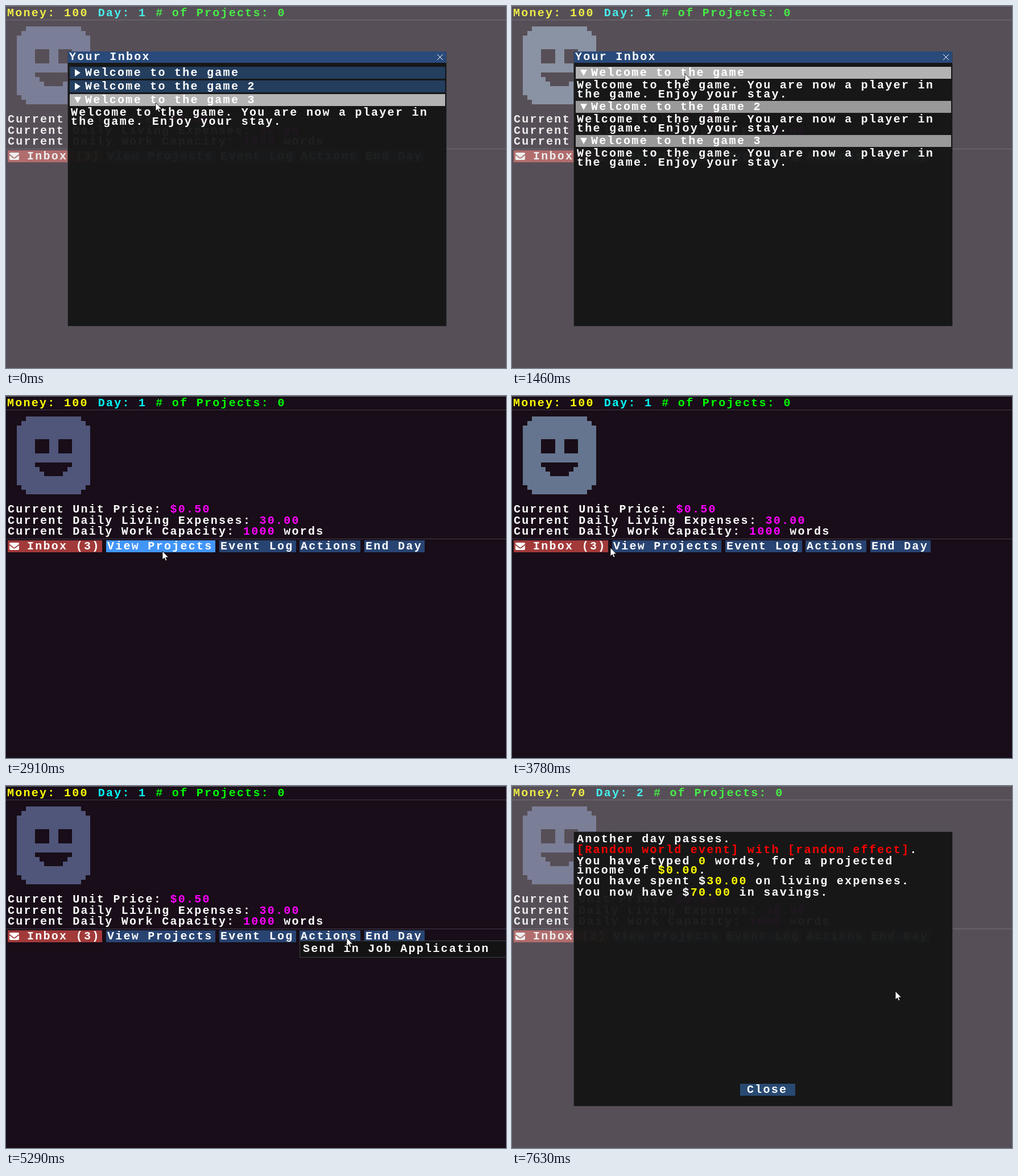
Write an HTML page that moves like this. It is 879 px wide and 637 px high and loops after 8000 ms.

```html
<!DOCTYPE html>
<html lang="en">
<head>
<meta charset="utf-8">
<title>Inbox</title>
<style>
  html, body { margin: 0; width: 100%; height: 100%; overflow: hidden; background: #180d18; }
  #stage {
    position: absolute; left: 0; top: 0; width: 879px; height: 637px; overflow: hidden;
    background: #180d18; color: #fff; cursor: default;
    font: bold 20px/16px "Liberation Mono", monospace; letter-spacing: 2.27px;
  }
  #stage * { position: absolute; box-sizing: border-box; }
  #stage .text { white-space: pre; }
  #stage .text b { position: static; }
  .layer { left: 0; top: 0; width: 879px; height: 637px; }
  .rule { background: #423d4c; }
  .panel { background: rgba(20, 20, 20, .94); border: 1px solid rgba(110, 110, 128, .5); }
  .button { background: rgba(66, 150, 250, .4); }
  .alert { background: #a23a3a; }
  .button.hot { background: #4296fa; }
  .header { background: rgba(66, 150, 250, .31); }
  .header.hot { background: rgba(66, 150, 250, .8); }
  .header.open { background: #999; }
  .header.open.hot { background: #b3b3b3; }
  .arrow { background: #fff; clip-path: polygon(9% 0, 91% 50%, 9% 100%); }
  .open .arrow { clip-path: polygon(0 7%, 100% 7%, 50% 93%); }
  .item.hot { background: rgba(66, 150, 250, .8); }
  .yellow { color: #ff0; } .cyan { color: #0ff; } .green { color: #0f0; }
  .pink { color: #f0f; } .red { color: #f00; }
</style>
</head>
<body>
<div id="stage"></div>
<script>
const LOOP = 8000;
const OPEN_2 = 670, OPEN_1 = 1160, CLOSE_INBOX = 2550;
const MENU = 5290, SUBMENU = 6730, MENU_END = 7210, NEW_DAY = 7300;
const BLINK = 1438, BLINK_START = 40;
const ADVANCE = 14.27, GAP = 17;

const stage = document.getElementById('stage');

function box(parent, x, y, w, h, cls = '') {
  const el = document.createElement('div');
  el.className = cls;
  el.style.cssText = `left:${x}px;top:${y}px;width:${w}px;height:${h}px`;
  return parent.appendChild(el);
}

// y is the middle of the capitals
function text(parent, x, y, html, cls = '') {
  const el = document.createElement('div');
  el.className = 'text ' + cls;
  el.style.left = x + 'px';
  el.style.top = y - 7 + 'px';
  el.innerHTML = html;
  return parent.appendChild(el);
}

function svg(parent, x, y, w, h, shapes) {
  const el = box(parent, x, y, w, h);
  el.innerHTML = `<svg width="${w}" height="${h}" style="overflow:visible">${shapes}</svg>`;
  return el;
}

const layer = () => box(stage, 0, 0, 879, 637, 'layer');
const show = (el, on) => { el.style.visibility = on ? 'visible' : 'hidden'; };
const clamp = v => Math.max(0, Math.min(1, v));

// Main screen
const main = layer();
const money = text(main, 2, 12, '', 'yellow');
const day = text(main, 0, 12, '', 'cyan');
const projects = text(main, 0, 12, '# of Projects: 0', 'green');
box(main, 0, 24, 879, 1, 'rule');

const cells = [
  [2, 0, 12, 1], [1, 1, 14, 1], [0, 2, 16, 13], [1, 15, 14, 1], [2, 16, 12, 1]
];
const holes = [
  [4, 5, 3, 3], [9, 5, 3, 3], [4, 10, 8, 1], [5, 11, 6, 1], [6, 12, 4, 1]
];
const rects = (list, attr = '') => list.map(([x, y, w, h]) =>
  `<rect x="${x}" y="${y}" width="${w}" height="${h}" ${attr}/>`).join('');
const face = svg(main, 19.4, 35.6, 130, 138,
  `<g transform="scale(8.08)" shape-rendering="crispEdges">${rects(cells)}${rects(holes, 'fill="#180d18"')}</g>`);

text(main, 3, 199, 'Current Unit Price: <b class="pink">$0.50</b>');
text(main, 3, 219, 'Current Daily Living Expenses: <b class="pink">30.00</b>');
text(main, 3, 238, 'Current Daily Work Capacity: <b class="pink">1000</b> words');
box(main, 0, 251, 879, 1, 'rule');

box(main, 3, 254, 166, 21, 'alert');
svg(main, 6, 258, 17, 13,
  '<rect width="17" height="13" rx="2" fill="#fff"/>' +
  '<path d="M0 3.5L7 9Q8.500 10 10 9L17 3.500" fill="none" stroke="#a23a3a" stroke-width="1.600"/>');
text(main, 37, 264, 'Inbox (3)');

function button(parent, x, y, w, label, pad = 2) {
  const el = box(parent, x, y, w, 21, 'button');
  text(el, pad, 10, label);
  return { el, x, y, w };
}
const buttons = [
  button(main, 176, 254, 192, 'View Projects'),
  button(main, 375, 254, 135, 'Event Log'),
  button(main, 516, 254, 107, 'Actions'),
  button(main, 630, 254, 106, 'End Day')
];

const dim = layer();
dim.style.background = '#ccc';

// Inbox window
const inbox = layer();
box(inbox, 108, 80, 667, 484, 'panel');
box(inbox, 109, 80, 665, 20).style.background = '#294a7a';
text(inbox, 111, 89, 'Your Inbox');
svg(inbox, 758, 85, 10, 10, '<path d="M0 0L10 10M10 0L0 10" stroke="#fff"/>');

const mails = [['', OPEN_1], [' 2', OPEN_2], [' 3', 0]].map(([suffix, opens]) => {
  const el = box(inbox, 112, 0, 660, 21, 'header');
  box(el, 8, 4, 12, 13, 'arrow');
  text(el, 27, 10, 'Welcome to the game' + suffix);
  const body = text(el, 2, 32,
    'Welcome to the game. You are now a player in\nthe game. Enjoy your stay.');
  return { el, body, opens };
});

// End of day window
const report = layer();
box(report, 108, 80, 667, 484, 'panel');
[
  [93, 'Another day passes.'],
  [112, '<b class="red">[Random world event] with [random effect]</b>.'],
  [132, 'You have typed <b class="yellow">0</b> words, for a projected\nincome of <b class="yellow">$0.00</b>.'],
  [167, 'You have spent $<b class="yellow">30.00</b> on living expenses.'],
  [187, 'You now have $<b class="yellow">70.00</b> in savings.']
].forEach(([y, line]) => text(report, 114, y, line));
button(report, 401, 524, 97, 'Close', 12);

// Popups
function popup(x, y, w, label, pad) {
  const el = box(stage, x, y, w, 30, 'panel');
  const item = box(el, 4, 4, w, 20, 'item');
  text(el, pad, 13, label);
  return { el, item };
}
const tip = popup(0, 0, 213, 'I am a tooltip', 5);
const menu = popup(516, 272, 380, 'Send in Job Application', 5);
const submenu = popup(528, 285, 380, 'Send in Job Application', 5);

const pointer = svg(stage, 0, 0, 12, 19,
  '<path d="M0 0V15L3.400 11.800L5.700 17L8 16L5.800 11H10.500Z" fill="#fff" stroke="#000" stroke-width=".8"/>');
box(stage, 0, 0, 879, 1).style.background = '#6f6b70';

// Pointer path: time, x, y
const path = [
  [0, 263, 170], [30, 263, 170], [520, 296, 146], [700, 296, 146],
  [910, 304, 119], [1460, 304, 119], [1670, 400, 138], [1850, 400, 138],
  [1990, 615, 128], [2280, 763, 90], [2570, 763, 90],
  [2910, 276, 273], [3200, 190, 266], [3530, 190, 266], [3600, 173, 267],
  [3780, 173, 267], [4000, 330, 268], [4130, 399, 269], [4290, 390, 263],
  [4370, 391, 264], [4710, 391, 264], [4800, 410, 271], [4870, 455, 286],
  [4960, 548, 286], [5050, 599, 267], [5750, 599, 267], [5860, 592, 282],
  [6190, 592, 282], [6490, 528, 285], [7040, 528, 285], [7190, 678, 265],
  [7330, 678, 266], [7630, 674, 361], [LOOP, 674, 361]
];

function slope(i, k) {
  const a = path[i - 1], b = path[i], c = path[i + 1];
  if (!a || !c || (b[k] - a[k]) * (c[k] - b[k]) <= 0) return 0;
  return (c[k] - a[k]) / (c[0] - a[0]);
}

function at(t) {
  const i = Math.max(0, path.findIndex(p => p[0] > t) - 1);
  const a = path[i], b = path[i + 1], d = b[0] - a[0], u = (t - a[0]) / d;
  return [1, 2].map(k => {
    const e = u * u * (3 - 2 * u);
    return a[k] + (b[k] - a[k]) * e +
      d * u * (1 - u) * ((1 - u) * slope(i, k) - u * slope(i + 1, k));
  });
}

function draw(t) {
  const [x, y] = at(t).map(Math.round);
  const inboxOpen = t < CLOSE_INBOX, dayOver = t >= NEW_DAY;
  const menuOpen = t >= MENU && t < MENU_END;
  const blocked = inboxOpen || menuOpen || dayOver;

  pointer.style.transform = `translate(${x}px, ${y}px)`;
  face.style.fill = Math.floor((t - BLINK_START) / BLINK) % 2 ? '#50557a' : '#66758f';

  money.textContent = dayOver ? 'Money: 70' : 'Money: 100';
  day.textContent = dayOver ? 'Day: 2' : 'Day: 1';
  const dayX = 2 + money.textContent.length * ADVANCE + GAP;
  day.style.left = dayX + 'px';
  projects.style.left = dayX + 6 * ADVANCE + GAP - 1 + 'px';

  const fadeOut = 1 - clamp((t - CLOSE_INBOX) / 100);
  const fadeIn = clamp((t - NEW_DAY) / 167);
  dim.style.opacity = .35 * Math.max(fadeOut, fadeIn);

  show(inbox, inboxOpen);
  let top = 107;
  for (const { el, body, opens } of mails) {
    const open = t >= opens;
    el.style.top = top + 'px';
    el.classList.toggle('open', open);
    el.classList.toggle('hot', x >= 112 && x < 772 && y >= top && y < top + 21);
    show(body, open && inboxOpen);
    top += open ? 60 : 24;
  }

  const over = buttons.map(b => !blocked && x >= b.x && x < b.x + b.w && y >= b.y && y < b.y + 21);
  buttons.forEach((b, i) => b.el.classList.toggle('hot', over[i]));

  show(tip.el, over[1]);
  tip.el.style.left = x + 15 + 'px';
  tip.el.style.top = y - 1 + 'px';

  show(menu.el, menuOpen);
  menu.item.classList.toggle('hot', x >= 520 && y >= 276 && t < SUBMENU);
  show(submenu.el, menuOpen && t >= SUBMENU);
  show(report, dayOver);
}

const start = performance.now();
function tick() {
  draw((performance.now() - start) % LOOP);
  requestAnimationFrame(tick);
}
tick();
</script>
</body>
</html>
```
